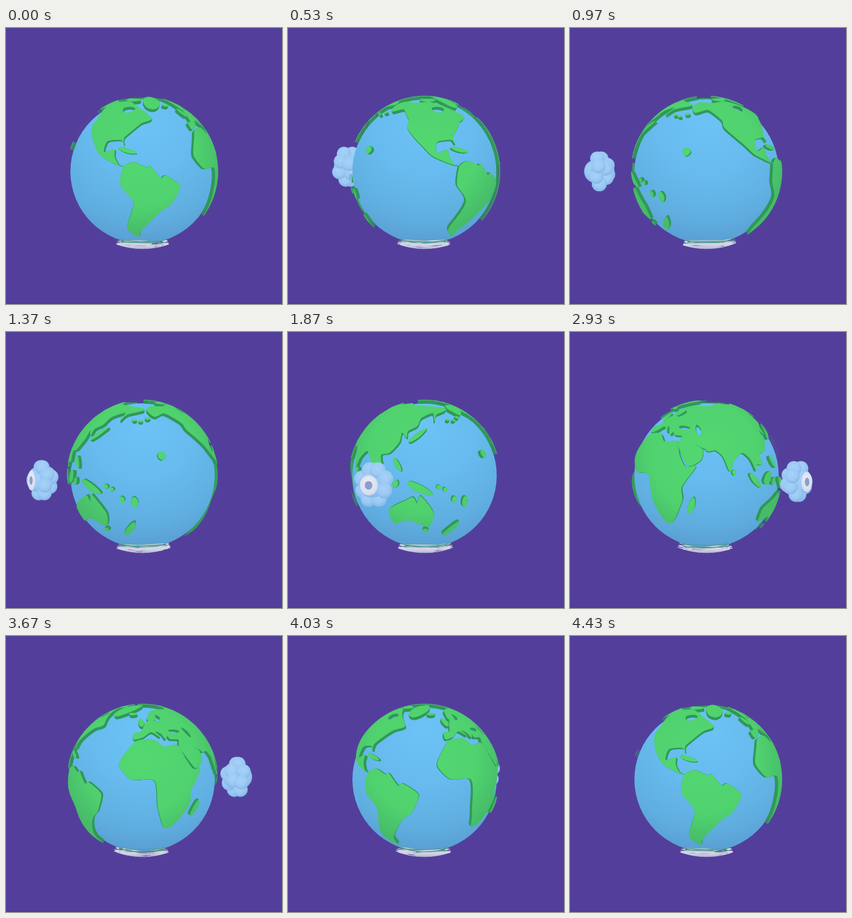
Write an HTML page that moves like this. It is 480x480 px and loops after 4.46 s.

```html
<!DOCTYPE html>
<html lang="en">
<head>
<meta charset="utf-8">
<title>Globe</title>
<style>
html, body { margin: 0; width: 100%; height: 100%; overflow: hidden; background: #533f9b; }
svg { display: block; width: 100vw; height: 100vh; }
</style>
</head>
<body>
<svg viewBox="0 0 480 480">
  <defs>
    <radialGradient id="sea" gradientUnits="userSpaceOnUse" cx="238" cy="165" r="225">
      <stop offset="0" stop-color="#6cc3f6"/>
      <stop offset=".4" stop-color="#67bbee"/>
      <stop offset=".75" stop-color="#60aee0"/>
      <stop offset="1" stop-color="#5799cd"/>
    </radialGradient>
    <radialGradient id="land" gradientUnits="userSpaceOnUse" cx="234" cy="215" r="145">
      <stop offset="0" stop-color="#53d871"/>
      <stop offset=".65" stop-color="#50d26f"/>
      <stop offset="1" stop-color="#46bb68"/>
    </radialGradient>
    <linearGradient id="ice" gradientUnits="userSpaceOnUse" x1="0" y1="369" x2="0" y2="386">
      <stop offset="0" stop-color="#dfe2ec"/>
      <stop offset=".6" stop-color="#cfd1e2"/>
      <stop offset="1" stop-color="#aaa6cb"/>
    </linearGradient>
    <radialGradient id="puff" cx=".46" cy=".38" r=".62">
      <stop offset="0" stop-color="#a6d2f8"/>
      <stop offset=".6" stop-color="#9ccaf4"/>
      <stop offset="1" stop-color="#86b6e8"/>
    </radialGradient>
    <radialGradient id="badge" cx=".48" cy=".4" r=".6">
      <stop offset="0" stop-color="#eef0f8"/>
      <stop offset="1" stop-color="#d3daec"/>
    </radialGradient>
  </defs>
  <rect width="480" height="480" fill="#533f9b"/>
  <rect y="478.5" width="480" height="1.5" fill="#4b3f80"/>
  <g id="globe">
    <path id="backLand" fill="#349c5d"/>
    <path id="backIce" fill="url(#ice)"/>
    <circle cx="237.5" cy="249.5" r="125.5" fill="url(#sea)"/>
    <path id="sides" fill="#309858" stroke="#309858" stroke-linejoin="round"/>
    <path id="tops" fill="url(#land)" stroke="url(#land)" stroke-width=".6" stroke-linejoin="round"/>
    <path id="iceSides" fill="#d9dde9" stroke="#4e9a94" stroke-width=".8"/>
    <path id="iceTop" fill="url(#ice)" stroke="url(#ice)"/>
  </g>
  <g id="cloud"></g>
</svg>
<script>
const LOOP = 4460, CX = 237.5, CY = 249.5, R = 125.5, RAD = Math.PI / 180;
const TILT = 5 * RAD, SIN_T = Math.sin(TILT), COS_T = Math.cos(TILT);
const START_LON = -64, ORBIT = 188, CLOUD_START = -178.5;
const $ = id => document.getElementById(id);

// Coastlines as longitude, latitude pairs.
const northAmerica = [-167,65, -157,71, -125,70, -95,72, -72,64, -53,50, -65,45, -75,37, -81,31, -80,25.5,
  -83,29.5, -96,28, -97,19, -88,21.5, -87,16, -83,10, -78,8.5, -85,10, -100,16.5, -109,25, -124,40,
  -125,48, -140,60, -158,56];
const southAmerica = [-79,8, -71,12, -61,8, -58,9, -50,0, -46,1.5, -34,-7, -40,-21, -48,-27, -58,-38,
  -67,-48, -68,-55.5, -77,-50, -80,-43, -71,-20, -81,-6];
const africa = [-6,35.5, 10,37, 19,30.5, 32,31.5, 37,20, 43,11.5, 51,11.5, 40,-4, 40,-14, 33,-27, 26,-34.5,
  19,-34.5, 12,-17, 9,4, -9,5, -19,15, -16,24];
const europe = [-9,37, -9,43, -2,44, 2,51, 9,57, 20,55, 27,60, 22,64, 17,57, 6,58, 14,68, 26,71, 62,69,
  62,27, 49,30, 56,25, 55,17, 45,12.5, 34,29, 36,36, 27,37, 25,40, 22,37, 19,42, 13,45, 17,39, 9,44, 0,39];
const asia = [58,68, 75,73, 100,77, 113,74, 140,72, 180,69, 188,65, 163,59, 157,51, 158,61, 141,55, 137,46,
  128,41, 128,35, 122,39.5, 122,31, 115,22, 107,20, 109,12, 102,12, 101,7, 97,16, 90,22, 82,16, 77.5,8,
  73,19, 67,24.5, 58,26.5];
const australia = [114,-23, 129,-15, 136,-12, 139,-17, 142,-11, 153,-26, 148,-38, 131,-31.5, 116,-35];

// Islands and lakes: longitude, latitude, half length, half width, heading.
const islands = [[-42,72,12,6,75], [-97,76,6,3,0], [-77,21,7,1.5,-15], [-18,65,3,1.6,0], [-2,54,4.5,2,100],
  [47,-19,6.5,2.3,70], [138,37,8.5,1.8,45], [123,13,5.5,1.8,-55], [100,0,7.5,2,-45], [114,1,5.5,3.5,50],
  [122,-2,3,2,60], [141,-5,10,2.8,-25], [172.5,-41,8,2.4,57]];
const isles = [[-159,20,3,2.9], [179,-16,2.4,4.2], [169,-14,1.8,2.4], [156,-4,1.8,1.6], [161,-6,1.6,1.6],
  [146,-42,2,2], [81,7,1.5,2], [175,52,1.6,1], [183,51,1.6,1], [192,54,1.9,1.3]];
const lakes = [[-86,60,4.8,4,10], [35,44,4.8,1.9,-5], [51,42,5.2,2,110]];

function blob([lon, lat, len, wid, heading = 0]) {
  const c = Math.cos(heading * RAD), s = Math.sin(heading * RAD), out = [];
  for (let i = 0; i < 8; i++) {
    const a = i * Math.PI / 4, k = i % 3 ? 1 : 1.12;
    const u = len * k * Math.cos(a), v = wid * k * Math.sin(a);
    const y = lat + u * s + v * c;
    out.push(lon + (u * c - v * s) / Math.cos(y * RAD), y);
  }
  return out;
}

// Polar cap with one peninsula.
function capCoast() {
  const out = [];
  for (let i = 0; i < 18; i++) {
    const lon = -60 - 20 * i;
    out.push(lon, -71.2 + 1.2 * Math.sin(2 * lon * RAD) + (i ? 0 : 5));
  }
  return out;
}

// Smooth closed curve through the points, wound one way, as unit vectors.
function shape(flat, dir = 1, steps = 5) {
  const pts = [];
  for (let i = 0; i < flat.length; i += 2) pts.push([flat[i], flat[i + 1]]);
  const n = pts.length;
  const area = pts.reduce((s, p, i) => {
    const q = pts[(i + 1) % n];
    return s + p[0] * q[1] - q[0] * p[1];
  }, 0);
  if (area * dir < 0) pts.reverse();
  const out = [];
  for (let i = 0; i < n; i++) {
    const [a, b, c, d] = [-1, 0, 1, 2].map(k => pts[(i + k + n) % n]);
    for (let s = 0; s < steps; s++) {
      const u = s / steps;
      const [lon, lat] = [0, 1].map(k => {
        const m0 = (c[k] - a[k]) * .38, m1 = (d[k] - b[k]) * .38;
        return b[k] + m0 * u + (3 * (c[k] - b[k]) - 2 * m0 - m1) * u * u
          + (2 * (b[k] - c[k]) + m0 + m1) * u * u * u;
      });
      const cl = Math.cos(lat * RAD);
      out.push([cl * Math.sin(lon * RAD), Math.sin(lat * RAD), cl * Math.cos(lon * RAD)]);
    }
  }
  return out;
}

const lands = [northAmerica, southAmerica, africa, europe, asia, australia].map(f => shape(f))
  .concat(islands.map(b => shape(blob(b), 1, 3)), isles.map(b => shape(blob(b), 1, 2)),
    lakes.map(b => shape(blob(b), -1, 3)));
const ice = [shape(capCoast())];

// Turn the globe to a centre longitude and tip it toward the viewer.
function turn(shapes, lon) {
  const s = Math.sin(lon * RAD), c = Math.cos(lon * RAD);
  return shapes.map(pts => pts.map(([x, y, z]) => {
    const depth = z * c + x * s;
    return [x * c - z * s, -(y * COS_T - depth * SIN_T), y * SIN_T + depth * COS_T];
  }));
}

// Outline of one hemisphere; points on the other one slide to the limb.
function outline(shapes, side, heights) {
  let d = "";
  for (const pts of shapes) {
    if (!pts.some(p => p[2] * side > 0)) continue;
    const flat = pts.map(([x, y, z]) => {
      const k = z * side > 0 ? 1 : 1 / (Math.hypot(x, y) || 1);
      return [x * k, y * k];
    });
    for (const h of heights)
      d += "M" + flat.map(([x, y]) => (CX + x * R * h).toFixed(1) + " " + (CY + y * R * h).toFixed(1)).join("L") + "Z";
  }
  return d;
}

// Cloud parts: sideways, up, outward, radius.
const puffs = [[0, 0, 6, 20.5], [0, 0, -6, 20.5]];
for (let i = 0; i < 8; i++) {
  const a = (i + .5) * Math.PI / 4;
  puffs.push([21 * Math.cos(a), 24 * Math.sin(a), i % 2 ? 2 : -2, 12.5]);
}
for (let i = 0; i < 4; i++) {
  const a = (i + .3) * Math.PI / 2;
  puffs.push([12 * Math.cos(a), 12 * Math.sin(a), -13, 13]);
}

function add(tag, fill) {
  const el = document.createElementNS("http://www.w3.org/2000/svg", tag);
  el.setAttribute("fill", fill);
  $("cloud").appendChild(el);
  return el;
}
function set(el, attrs) {
  for (const k in attrs) el.setAttribute(k, attrs[k]);
}
const balls = puffs.map(() => add("circle", "url(#puff)"));
const badge = add("ellipse", "url(#badge)");
const mark = add("ellipse", "#8b9fca");

function drawCloud(turned) {
  const a = (CLOUD_START + turned) * RAD, s = Math.sin(a), c = Math.cos(a);
  const x = 236 + ORBIT * s, y = 252 + 15 * c;
  const grow = 1 + .17 * Math.max(0, c) ** 3;
  puffs.map(([e, u, n, r]) => ({ x: e * c + n * s, y: -u, z: n * c - e * s, r }))
    .sort((p, q) => p.z - q.z)
    .forEach((p, i) => set(balls[i], { cx: x + p.x * grow, cy: y + p.y * grow, r: p.r * grow }));
  const face = Math.max(0, c), bx = x + 19 * s, by = y + 1.5 * c;
  set(badge, { cx: bx, cy: by, rx: 17.5 * face, ry: face ? 17.5 : 0 });
  set(mark, { cx: bx + .8 * s, cy: by, rx: 7.5 * face, ry: face ? 7.5 : 0 });
  const svg = $("globe").parentNode, behind = c < 0;
  if (behind !== ($("cloud").nextElementSibling === $("globe")))
    svg.insertBefore($("cloud"), behind ? $("globe") : null);
}

function draw(ms) {
  const turned = 360 * (ms % LOOP) / LOOP, lon = START_LON - turned;
  const land = turn(lands, lon), cap = turn(ice, lon);
  const path = (id, d) => $(id).setAttribute("d", d);
  path("backLand", outline(land, -1, [1.02, 1.045]));
  path("backIce", outline(cap, -1, [1.03, 1.07]));
  path("sides", outline(land, 1, [1, 1.012, 1.024, 1.036]));
  path("tops", outline(land, 1, [1.045]));
  path("iceSides", outline(cap, 1, [1, 1.03]));
  path("iceTop", outline(cap, 1, [1.05, 1.07]));
  drawCloud(turned);
}

const begin = performance.now();
function tick() {
  draw(performance.now() - begin);
  requestAnimationFrame(tick);
}
tick();
</script>
</body>
</html>
```
